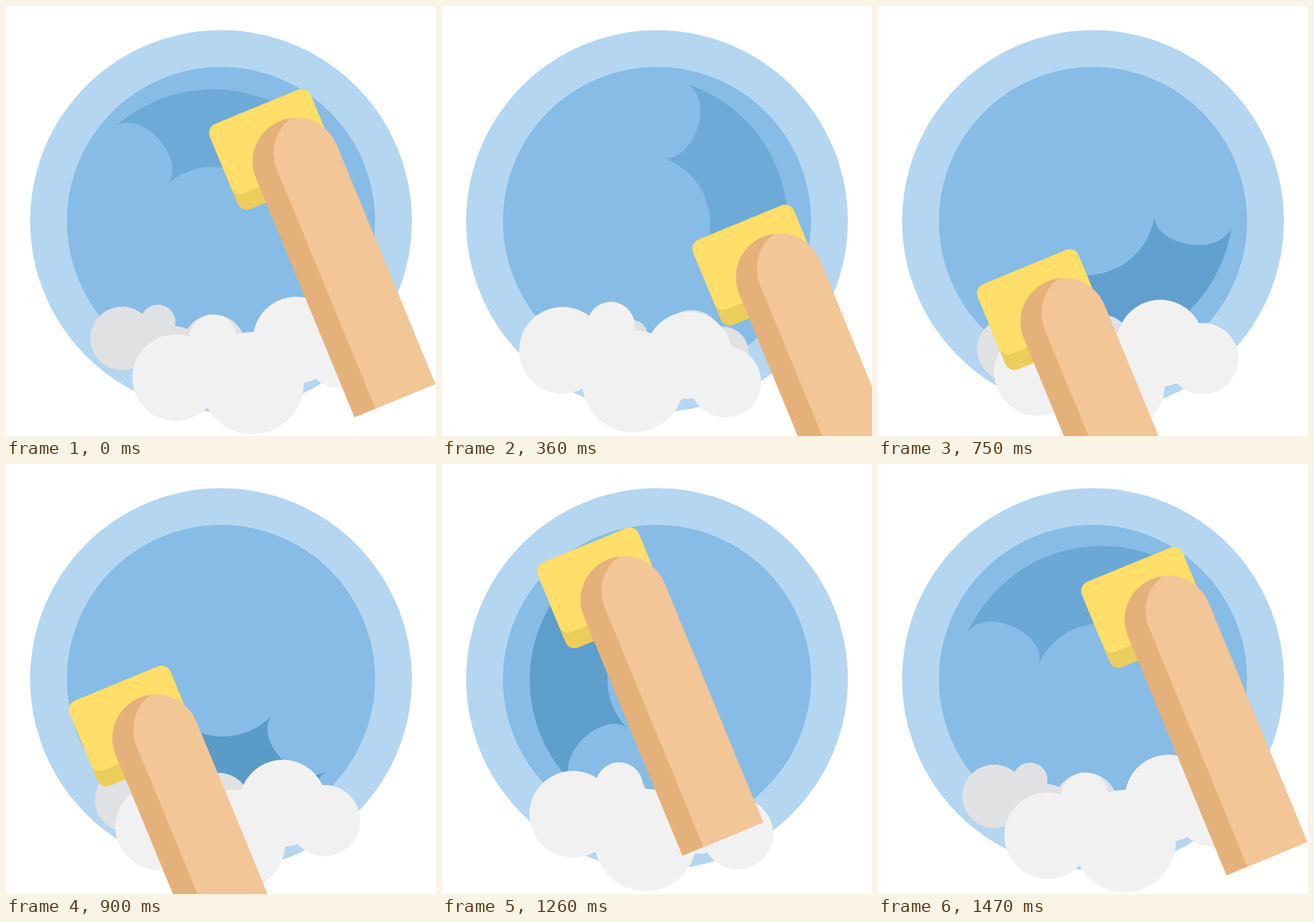
An HTML page that plays this animation: 748x748 px, repeating every 1500 ms.

```html
<!DOCTYPE html>
<html lang="en">
<head>
<meta charset="utf-8">
<title>Washing up</title>
<style>
  html, body { margin: 0; width: 100%; height: 100%; overflow: hidden; background: #fff; }
  svg { display: block; width: 100vw; height: 100vh; }
</style>
</head>
<body>
<svg viewBox="0 0 748 748">
  <defs>
    <g id="foam">
      <circle r="89"/>
      <circle cx="-133.7" cy="-9.5" r="75.5"/>
      <circle cx="-69" cy="-78" r="41.5"/>
      <circle cx="76" cy="-74.8" r="75.5"/>
      <circle cx="151.5" cy="-53" r="62"/>
    </g>
  </defs>
  <circle cx="374" cy="374" r="332" fill="#b4d6f1"/>
  <circle cx="374" cy="374" r="268" fill="#86bce6"/>
  <path id="streak"/>
  <use id="back" href="#foam" fill="#e0e1e2"/>
  <use id="front" href="#foam" fill="#f1f1f1"/>
  <g id="hand">
    <rect x="-122.5" y="-114.2" width="190" height="160.2" rx="17" fill="#ebcd5c"/>
    <rect x="-122.5" y="-114.2" width="190" height="131" rx="17" fill="#ffde69"/>
    <path d="M-76 450V0A76 76 0 0 1 76 0V450Z" fill="#e5b17a"/>
    <path d="M-36.5 450V0A76 76 0 0 1 19.75 -73.4A76 76 0 0 1 76 0V450Z" fill="#f2c697"/>
  </g>
</svg>
<script>
const STEP = 30, STEPS = 50, TURN = 49;
const RAD = Math.PI / 180;
const el = id => document.getElementById(id);
const move = (id, transform) => el(id).setAttribute('transform', transform);

// Evenly timed points on two closed curves
const handLoop = [[0, 0], [98, 113], [56, 237], [-98, 302.5], [-224, 240], [-268, 99], [-188, -34]];
const streakLoop = [[360, 400], [347, 387], [348, 365], [360, 348], [384, 357], [407, 370], [393, 395]];

// Smooth periodic curve through an odd number of points; turn 0..1 is one lap
function orbit(points, turn) {
  const n = points.length;
  let x = 0, y = 0;
  points.forEach(([px, py], j) => {
    const a = Math.PI * (turn - j / n);
    const w = Math.abs(Math.sin(a)) < 1e-9 ? 1 : Math.sin(n * a) / (n * Math.sin(a));
    x += w * px;
    y += w * py;
  });
  return [x, y];
}

// Straight rise from 0 to 1 and back
const hump = (s, from, peak, to) =>
  Math.max(0, Math.min((s - from) / (peak - from), (to - s) / (to - peak)));

// Band from a curved tail to the head, hidden under the sponge
function streakPath(cx, cy, head, tail) {
  const cos = Math.cos(tail), sin = Math.sin(tail);
  const at = (r, q) => `${cx + r * cos - q * sin} ${cy + r * sin + q * cos}`;
  const end = r => `${cx + r * Math.cos(head)} ${cy + r * Math.sin(head)}`;
  return `M${at(255, 0)}C${at(240, 55)} ${at(128, 50)} ${at(120, 0)}` +
    `A120 120 0 0 1 ${end(120)}L${end(255)}A255 255 0 0 0 ${at(255, 0)}Z`;
}

function draw(s) {
  const [dx, dy] = orbit(handLoop, s / TURN);
  move('hand', `translate(${505 + dx} ${270.5 + dy}) rotate(-22.4)`);

  const [cx, cy] = orbit(streakLoop, s / 56);
  const head = Math.atan2(244 + dy - cy, 465 + dx - cx);
  const length = Math.min(75 + 1.23 * s, 121 - 0.6 * s);
  const dark = s > 19 ? Math.sin(Math.PI * (s - 19) / 31) : 0;
  el('streak').setAttribute('d', streakPath(cx, cy, head, head - length * RAD));
  el('streak').setAttribute('fill', `rgb(${110 - 22 * dark}, ${170 - 17 * dark}, ${216 - 18 * dark})`);

  const u = 24.2 * (hump(s, 0, 14.8, 27) + hump(s, 27, 38, TURN));
  move('front', `translate(${429 - 4.7 * u - 0.011 * u * u} ${656 - 0.0085 * u * u}) rotate(${u})`);

  const b = 24 * (hump(s, 0, 15, 29) + hump(s, 29, 40, TURN));
  move('back', `rotate(${-b} 374 374) translate(289.5 621.5) rotate(22.3) scale(.73)`);
}

const start = performance.now();
function tick() {
  draw(Math.floor((performance.now() - start) / STEP) % STEPS);
  requestAnimationFrame(tick);
}
tick();
</script>
</body>
</html>
```
